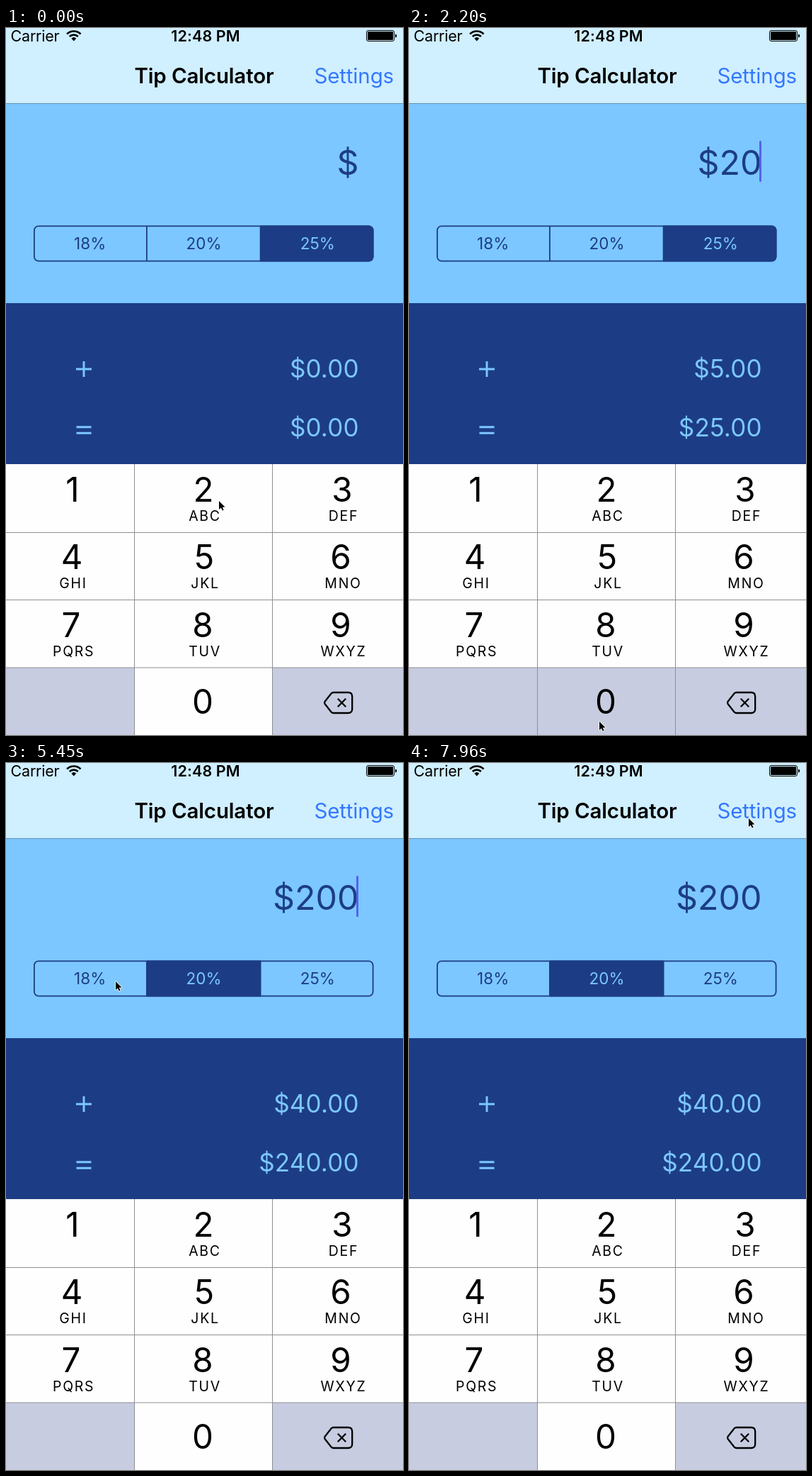
These frames come from a looping animation (561x997 px, 8 s). An HTML page:

```html
<!DOCTYPE html>
<html lang="en">
<head>
<meta charset="utf-8">
<title>Tip Calculator</title>
<style>
  html, body { margin: 0; width: 100%; height: 100%; overflow: hidden; background: #1c3d85; }
  svg { display: block; width: 561px; height: 997px; font-family: Inter, Roboto, sans-serif; }
  .mid { text-anchor: middle; }
  .end { text-anchor: end; }
  .status { font-size: 21.5px; }
  .bold { font-weight: 600; }
  .nav { font-size: 29.5px; letter-spacing: -.15px; }
  .sum { font-size: 35px; letter-spacing: .15px; fill: #7cc7ff; }
  .digit { font-size: 47.5px; }
  .letters { font-size: 19.5px; letter-spacing: 1.7px; }
  .seg { font-size: 22.5px; }
</style>
</head>
<body>
<svg id="stage" viewBox="0 0 561 997">
  <!-- status and title bar -->
  <rect width="561" height="106" fill="#d0efff"/>
  <rect y="106" width="561" height="282" fill="#7cc7ff"/>
  <rect y="106" width="561" height="1" fill="#5f94b8"/>
  <text class="status" x="6.5" y="19" letter-spacing="-.2">Carrier</text>
  <g transform="translate(95.8 18.5)">
    <path d="M0 0L-3.4 -3.8A5 5 0 0 1 3.4 -3.8Z"/>
    <path d="M-6 -6.5A8.8 8.8 0 0 1 6 -6.5M-9.7 -10A13.8 13.8 0 0 1 9.7 -10" fill="none" stroke="#000" stroke-width="2.7"/>
  </g>
  <text id="clock" class="status bold mid" x="282" y="19" letter-spacing=".1"></text>
  <rect x="509.5" y="3.5" width="39" height="15" rx="2.5" fill="none" stroke="#000"/>
  <rect x="511" y="5" width="36" height="12" rx="1"/>
  <path d="M550 8.5q2.2 0 2.2 2.5t-2.2 2.5z"/>
  <text class="nav bold mid" x="280" y="78">Tip Calculator</text>
  <text class="nav end" x="548" y="78" letter-spacing="-.2" fill="#3478ff">Settings</text>

  <!-- bill -->
  <text id="bill" class="end" x="498.5" y="206.5" font-size="48.3" fill="#1c3d85"></text>
  <rect id="caret" x="495" y="159" width="3" height="58" rx="1.5" fill="#5661ee"/>
  <clipPath id="round"><rect x="39" y="278.5" width="480.5" height="51" rx="7"/></clipPath>
  <g id="segs" clip-path="url(#round)"></g>
  <rect x="39.9" y="279.4" width="478.7" height="49.2" rx="6" fill="none" stroke="#1c3d85" stroke-width="1.8"/>
  <path d="M198.9 279V329M359.6 279V329" stroke="#1c3d85" stroke-width="1.8"/>
  <g id="labels"></g>

  <!-- totals -->
  <rect y="388" width="561" height="227" fill="#1c3d85"/>
  <path d="M99 481H121M110 470V492M99.5 562.8H120.5M99.5 571.2H120.5" stroke="#7cc7ff" stroke-width="2.9"/>
  <text id="tip" class="sum end" x="498.7" y="493"></text>
  <text id="total" class="sum end" x="498.7" y="576"></text>

  <!-- number pad -->
  <rect y="615" width="561" height="382" fill="#fefefe"/>
  <path d="M0 902H181V997H0ZM377 902H561V997H377Z" fill="#c7cce0"/>
  <rect id="press" width="195" height="96" fill="#c7cce0"/>
  <path d="M181.5 615V997M376.5 615V997M0 711.5H561M0 806.5H561M0 902H561" stroke="#8e8f94"/>
  <g id="keys"></g>
  <path d="M462.5 937H483.5Q489.2 937 489.2 942.5V960.5Q489.2 966 483.5 966H462.5Q461 966 459.5 964.5L450.5 953Q449.5 951.5 450.5 950L459.5 938.5Q461 937 462.5 937ZM468.8 945.8L480.2 957.2M480.2 945.8L468.8 957.2" fill="none" stroke="#000" stroke-width="2.3"/>

  <path id="cursor" d="M0 0V12L2.8 9.4L4.8 13.6L6.6 12.8L4.8 8.7L8.5 8.5Z" stroke="#fff" stroke-width="1.6" paint-order="stroke" stroke-linejoin="round"/>
</svg>
<script>
const LOOP = 8000;
const rates = [18, 20, 25];
const $ = id => document.getElementById(id);

function add(parent, tag, attrs, text = '') {
  const el = document.createElementNS('http://www.w3.org/2000/svg', tag);
  for (const name in attrs) el.setAttribute(name, attrs[name]);
  el.textContent = text;
  $(parent).append(el);
  return el;
}

// digit, its centre, letters, their centre
const pad = [
  ['1', 94, '', 0], ['2', 279, 'ABC', 280], ['3', 475, 'DEF', 476],
  ['4', 93, 'GHI', 94], ['5', 280, 'JKL', 280.5], ['6', 473, 'MNO', 475.5],
  ['7', 92, 'PQRS', 94.7], ['8', 278, 'TUV', 280], ['9', 473, 'WXYZ', 476]
];
pad.forEach(([digit, x, letters, lx], i) => {
  const y = 668 + Math.floor(Math.floor(i / 3) * 95.5);
  add('keys', 'text', { class: 'digit mid', x, y }, digit);
  if (letters) add('keys', 'text', { class: 'letters mid', x: lx + 1, y: y + 27 }, letters);
});
add('keys', 'text', { class: 'digit mid', x: 278, y: 967 }, '0');

const fills = [], labels = [];
rates.forEach((rate, i) => {
  fills.push(add('segs', 'rect', { x: 39 + 160 * i, y: 278, width: 161, height: 52, fill: '#1c3d85' }));
  labels.push(add('labels', 'text', { class: 'seg mid', x: [118.7, 279.5, 440.3][i], y: 312 }, rate + '%'));
});

// Each table row: step, value held from that step on
const typed = [[-1, ''], [2, '2'], [10, '20'], [15, '200']];
const picked = [[-1, 2], [26, 1], [39, 0], [47, 1]];
const touched = [[-1, -1], [25, 1], [26, -1], [37, 0], [39, -1], [46, 1], [47, -1]];
const pressed = [[-1, ''], [0, '2'], [2, ''], [9, '0'], [10, ''], [13, '0'], [15, '']];
const caretOn = [[-1, 0], [2, 1], [5, 0], [9, 1], [19, 0], [22, 1], [26, 0], [29, 1],
  [32, 0], [36, 1], [40, 0], [43, 1], [47, 0], [50, 1], [53, 0]];
// step, x, y of the pointer
const path = [[-1, 301, 667], [2, 301, 667], [6, 270, 984], [7, 269, 978], [16, 269, 978],
  [23, 311, 302], [30, 311, 302], [36, 155, 308], [39, 155, 308], [43, 278, 304],
  [47, 278, 304], [53, 480, 78]];

const held = (table, k) => table.filter(row => row[0] <= k).pop()[1];

function pointer(k) {
  const i = path.findIndex(p => p[0] > k);
  if (i < 0) return path[path.length - 1].slice(1);
  const a = path[i - 1], b = path[i];
  const u = (k - a[0]) / (b[0] - a[0]), e = u * u * (3 - 2 * u);
  return [1, 2].map(n => Math.round(a[n] + (b[n] - a[n]) * e));
}

const money = v => '$' + v.toFixed(2);

function draw(t) {
  // the screen refreshes about every 147 ms
  const k = t < 150 ? -1 : Math.floor((t - 136) / 147.3);
  const bill = held(typed, k), pick = held(picked, k), touch = held(touched, k), key = held(pressed, k);
  const tip = bill * rates[pick] / 100;

  $('clock').textContent = k < 50 ? '12:48 PM' : '12:49 PM';
  $('bill').textContent = '$' + bill;
  $('tip').textContent = money(tip);
  $('total').textContent = money(+bill + tip);
  $('caret').setAttribute('opacity', held(caretOn, k));
  fills.forEach((el, i) => el.setAttribute('opacity', i === pick ? 1 : i === touch ? 0.2 : 0));
  labels.forEach((el, i) => el.setAttribute('fill', i === pick ? '#7cc7ff' : '#1c3d85'));
  $('press').setAttribute('opacity', key ? 1 : 0);
  $('press').setAttribute('transform', `translate(182 ${key === '2' ? 615 : 902})`);
  $('cursor').setAttribute('transform', `translate(${pointer(k).join(' ')})`);
}

const start = performance.now();
function tick() {
  draw((performance.now() - start) % LOOP);
  requestAnimationFrame(tick);
}
tick();
</script>
</body>
</html>
```
